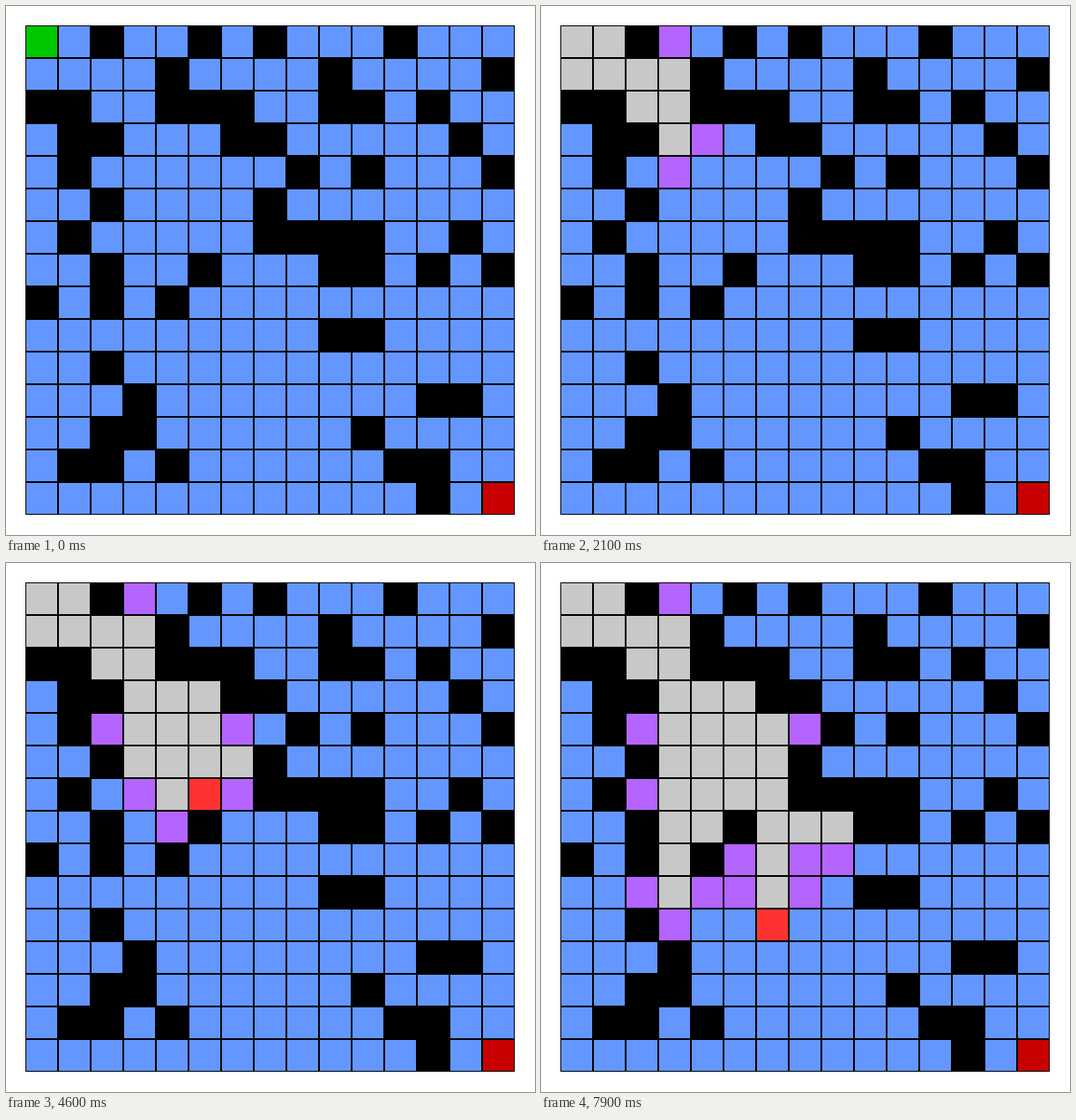
Write a matplotlib script that moves like this. It is 600 px wide and 600 px high and loops after 8 s.

```python
import matplotlib.pyplot as plt
from itertools import islice
from matplotlib.animation import FuncAnimation
from matplotlib.patches import Rectangle

SIZE, DPI = 600, 100
FRAMES, INTERVAL = 80, 100
LEFT, CELL = 22, 37

GRID = [
    "..#..#.#...#...",
    "....#....#....#",
    "##..###..##.#..",
    ".##...##.....#.",
    ".#......#.#...#",
    "..#....#.......",
    ".#.....####..#.",
    "..#..#...##.#.#",
    "#.#.#..........",
    ".........##....",
    "..#............",
    "...#........##.",
    "..##......#....",
    ".##.#......##..",
    "............#..",
]
N = len(GRID)
START, GOAL = (0, 0), (N - 1, N - 1)
STEPS = [(0, 1), (0, -1), (1, 0), (-1, 0)]  # right, left, down, up


def rgb(r, g, b):
    return r / 255, g / 255, b / 255


WALL = rgb(0, 0, 0)
FREE = rgb(100, 150, 255)
OPEN = rgb(180, 100, 255)
CURRENT = rgb(255, 50, 50)
CLOSED = rgb(200, 200, 200)
START_COLOR = rgb(0, 200, 0)
GOAL_COLOR = rgb(200, 0, 0)


def sift_up(heap, i):
    while i and heap[i][0] < heap[(i - 1) // 2][0]:
        parent = (i - 1) // 2
        heap[i], heap[parent] = heap[parent], heap[i]
        i = parent


def push(heap, item):
    heap.append(item)
    sift_up(heap, len(heap) - 1)


def pop(heap):
    """Remove the minimum; the hole sinks to a leaf, ties go right."""
    last = heap.pop()
    if not heap:
        return last
    top, i = heap[0], 0
    while (child := 2 * i + 1) < len(heap):
        right = child + 1
        if right < len(heap) and not heap[child][0] < heap[right][0]:
            child = right
        heap[i] = heap[child]
        i = child
    heap[i] = last
    sift_up(heap, i)
    return top


def is_free(r, c):
    return 0 <= r < N and 0 <= c < N and GRID[r][c] == "."


def distance(cell):
    return abs(cell[0] - GOAL[0]) + abs(cell[1] - GOAL[1])


def search():
    """A* over the grid, yielding the cell colours after each event."""
    colors = {(r, c): FREE if is_free(r, c) else WALL
              for r in range(N) for c in range(N)}
    colors[START], colors[GOAL] = START_COLOR, GOAL_COLOR
    yield dict(colors)

    cost, heap = {START: 0}, []
    push(heap, (distance(START), START))
    colors[START] = OPEN
    yield dict(colors)

    while heap:
        _, cell = pop(heap)
        colors[cell] = CURRENT
        yield dict(colors)
        if cell == GOAL:
            return
        colors[cell] = CLOSED
        for dr, dc in STEPS:
            near = cell[0] + dr, cell[1] + dc
            g = cost[cell] + 1
            if is_free(*near) and g < cost.get(near, N * N):
                cost[near] = g
                push(heap, (g + distance(near), near))
                colors[near] = OPEN
                yield dict(colors)


states = list(islice(search(), FRAMES))

fig = plt.figure(figsize=(SIZE / DPI, SIZE / DPI), dpi=DPI, facecolor="white")
ax = fig.add_axes([0, 0, 1, 1])
ax.set(xlim=(0, SIZE), ylim=(SIZE, 0))
ax.axis("off")


def add_square(x, y, side, color):
    return ax.add_patch(Rectangle((x, y), side, side, facecolor=color,
                                  linewidth=0, antialiased=False, snap=True))


add_square(LEFT, LEFT, N * CELL, WALL)
squares = {
    (r, c): add_square(LEFT + c * CELL + 1, LEFT + r * CELL + 1, CELL - 2, FREE)
    for r in range(N) for c in range(N) if is_free(r, c)
}


def update(i):
    for cell, square in squares.items():
        square.set_facecolor(states[i][cell])
    return list(squares.values())


anim = FuncAnimation(fig, update, frames=FRAMES, interval=INTERVAL,
                     repeat=True, repeat_delay=0, blit=False)
plt.show()
```
